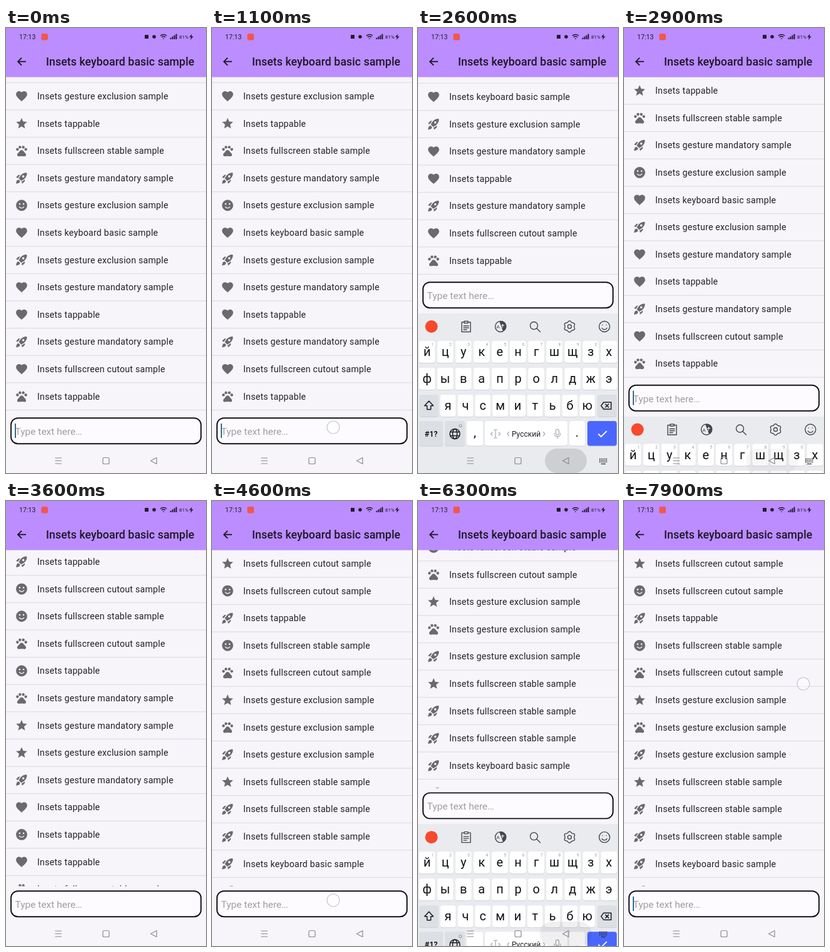
Write an HTML page that moves like this. It is 320 by 711 pixels and loops after 8 s.

```html
<!DOCTYPE html>
<html lang="en">
<head>
<meta charset="utf-8">
<title>Insets keyboard basic sample</title>
<style>
  html, body { margin: 0; width: 100%; height: 100%; overflow: hidden; background: #f7f5fa; }
  svg { display: block; width: 100%; height: 100%; font-family: Roboto, sans-serif; }
  .item { font-size: 14.22px; letter-spacing: .21px; fill: #222125; }
  .key { font-size: 20px; fill: #111214; text-anchor: middle; }
  .hint { font-size: 6.5px; fill: #9a9ca2; text-anchor: middle; }
  .line { fill: none; stroke: #44474c; stroke-width: 1.4; stroke-linecap: round; stroke-linejoin: round; }
  .dark { fill: none; stroke: #1c1d20; stroke-width: 1.5; stroke-linecap: round; stroke-linejoin: round; }
  .soft { fill: none; stroke: #a5a8ae; stroke-width: 1.2; stroke-linecap: round; stroke-linejoin: round; }
  .nav { fill: none; stroke: #8b8a8f; stroke-width: 1.2; stroke-linejoin: round; }
</style>
</head>
<body>
<svg id="stage" viewBox="0 0 320 711"></svg>
<script>
const LOOP = 8000, STEP = 100, PITCH = 43.6, LAST_Y = 588.6, LIFT = 217, SCROLL = 1473.4;

const icons = {
  h: 'M12 21.4C5.4 15.4 2 12.3 2 8.5 2 5.4 4.4 3 7.5 3c1.7 0 3.4.8 4.5 2.1C13.1 3.8 14.8 3 16.5 3 19.6 3 22 5.4 22 8.5c0 3.8-3.4 6.9-10 12.9z',
  t: 'M12 17.3L18.2 21l-1.7-7L22 9.2l-7.2-.6L12 2 9.2 8.6 2 9.2 7.5 14 5.8 21z',
  s: 'M12 2a10 10 0 1 0 .01 0zM8.5 8a1.5 1.5 0 1 0 .01 0zM15.5 8a1.5 1.5 0 1 0 .01 0z' +
     'M12 16c-1.5 0-2.8-.8-3.5-2H6.9c.8 2 2.8 3.5 5.1 3.5s4.3-1.5 5.1-3.5h-1.6c-.7 1.2-2 2-3.5 2z',
  p: 'M4.5 7a2.5 2.5 0 1 0 .01 0zM9 3a2.5 2.5 0 1 0 .01 0zM15 3a2.5 2.5 0 1 0 .01 0zM19.5 7a2.5 2.5 0 1 0 .01 0z' +
     'M17.3 14.9l-2.4-2.9c-1.6-1.9-4.2-1.9-5.8 0l-2.4 2.9c-1.3 1.3-3 2.8-2.7 4.8.3 1 1 2 2.4 2.3 1.4.2 3-.4 5.6-.4s4.2.6 5.6.4c1.4-.3 2.1-1.3 2.4-2.3.3-2-1.4-3.5-2.7-4.8z',
  r: 'M9.2 6.3c-2 2.3-3.4 5.6-3.6 5.9L2 10.7l4-4.1c.5-.5 1.2-.7 1.9-.5zM11.2 17s3.7-1.6 5.9-3.7c5.4-5.4 4.5-9.6 4.2-10.6-1-.3-5.2-1.2-10.6 4.2C8.6 9.1 7 12.8 7 12.8z' +
     'M17.6 14.8c-2.3 2-5.6 3.4-5.9 3.6l1.6 3.6 4.1-4c.4-.5.6-1.2.5-1.9zM9 18c0 .8-.3 1.6-.9 2.1C6.9 21.3 2 22 2 22s.7-4.9 1.9-6.1C6 13.8 9 15.5 9 18zM15 7a2 2 0 1 0 .01 0z'
};
const labels = ['gesture exclusion', 'tappable', 'fullscreen stable', 'gesture mandatory', 'keyboard basic', 'fullscreen cutout'];

// Rows from the bottom of the list upwards: icon letter, label index.
const rows = ('p1 h5 r3 h1 h3 r0 h4 s0 r3 p2 t1 h0 s5 t4 p0 r2 h5 s1 p2 h1 s1 h1 r3 t0 t3 p3 s1 p5 s2 s5 r1 ' +
  't0 h4 r2 r4 r2 r2 t2 r0 p0 t0 p5 s2 r1 s5 t5 h0 p3').split(' ');

const text = (x, y, s, attrs = '') => `<text x="${x}" y="${y}" ${attrs}>${s}</text>`;
const path = (d, cls = 'line', attrs = '') => `<path d="${d}" class="${cls}" ${attrs}/>`;
const rect = (x, y, w, h, rx, fill, attrs = '') =>
  `<rect x="${x}" y="${y}" width="${w}" height="${h}" rx="${rx}" fill="${fill}" ${attrs}/>`;
const circle = (x, y, r, attrs) => `<circle cx="${x}" cy="${y}" r="${r}" ${attrs}/>`;
const at = (x, y, inner) => `<g transform="translate(${x} ${y})">${inner}</g>`;

const listRow = (code, k) => {
  const [icon, n] = code;
  const label = 'Insets ' + labels[n] + (n === '1' ? '' : ' sample');
  return at(0, LAST_Y - PITCH * k,
    `<path d="${icons[icon]}" fill="#6b696e" fill-rule="evenodd" transform="translate(14.3 -10.7) scale(.889)"/>` +
    text(50, 5, label, 'class="item"') + rect(0, 21.3, 320, 1.1, 0, '#dddbe1'));
};

const header =
  rect(0, 0, 320, 78.5, 0, '#bb8dff') +
  text(21, 18, '17:13', 'font-size="10.6" fill="#211b2c"') +
  rect(56.5, 9, 10.5, 10.5, 2.5, '#f2564c') +
  rect(222, 11, 6, 6, 0, '#211b2c') + circle(237, 14, 2.8, 'fill="#211b2c"') +
  path('M247 12.5a7 7 0 0 1 10 0M249 14.8a4.2 4.2 0 0 1 6 0M251.3 17h1.4', 'wifi', 'fill="none" stroke="#211b2c" stroke-width="1.5"') +
  [0, 1, 2, 3].map(i => rect(262.5 + 3 * i, 15.5 - 2 * i, 2, 2.5 + 2 * i, .5, '#211b2c')).join('') +
  text(277, 17, '81%', 'font-size="8" fill="#211b2c"') +
  path('M297.5 9.5l-4.5 5h3l-1 4.5 4.8-5.5h-3z', 'bolt', 'fill="#211b2c"') +
  path('M32 53.7H19.5M25 47.7l-6 6 6 6', 'arrow', 'fill="none" stroke="#17121f" stroke-width="1.8"') +
  text(64, 60, 'Insets keyboard basic sample', 'font-size="17.8" font-weight="500" letter-spacing=".04" fill="#1d1628"');

const field =
  rect(0, 615.5, 320, 300, 0, '#f7f5fa') +
  rect(8, 623.2, 304, 41, 11, '#fdfbff', 'stroke="#121114" stroke-width="1.9"') +
  text(14.5, 650, 'Type text here…', 'font-size="15.5" fill="#9f9da2"') +
  rect(14, 632, 2, 23, 0, '#2b6f92', 'id="cursor"');

const key = (x, y, w, fill = '#fff', h = 35) =>
  rect(x, y + 1, w, h, 4, '#cdd0d6') + rect(x, y, w, h, 4, fill);
const wideKey = (x, w, fill) => key(x, 628, w, fill, 39.5);
const letters = (chars, x0, pitch, w, y, hints = '') => [...chars].map((c, i) => {
  const x = x0 + pitch * i;
  return key(x - w / 2, y, w) + text(x, y + 24, c, 'class="key"') +
    (hints[i] ? text(x + 8.5, y + 7.5, hints[i], 'class="hint"') : '');
}).join('');

const lobes = Array.from({ length: 48 }, (_, i) => {
  const a = i * Math.PI / 24, r = 8.2 + .9 * Math.cos(6 * a);
  return (r * Math.sin(a)).toFixed(2) + ' ' + (r * Math.cos(a)).toFixed(2);
});
const gear = path(`M${lobes.join('L')}z`) + circle(0, 0, 3, 'class="line"');
const search = circle(-1.5, -1.5, 6, 'class="line"') + path('M3 3l5.5 5.5');
const smile = circle(0, 0, 8.5, 'class="line"') + path('M-4 2.5c1.5 3 6.5 3 8 0M-3-2.5v.1M3-2.5v.1');
const clipboard = path('M-3-7h-4V8.5h14V-7h-4M-3-8.5h6v3h-6zM-4-1h8M-4 2h8M-4 5h5');
const translate = circle(0, 0, 8.5, 'class="line"') + path('M-2-8.5a8.5 8.5 0 1 1 6 16z', 'half', 'fill="#44474c"') +
  text(-6.5, 3, 'A', 'font-size="8" fill="#44474c"') + path('M1-2h5M3.5-4v2c0 3-1 4-2.5 5', 'half', 'fill="none" stroke="#fff"');
const globe = circle(0, 0, 8, 'class="dark"') + '<ellipse rx="3.6" ry="8" class="dark"/>' + path('M-7.5-3h15M-7.5 3h15', 'dark');

const GREY = '#dcdfe4', WHITE = '#fff';
const keyboard =
  rect(0, 456, 320, 300, 0, '#e9ebef') +
  circle(21.5, 477, 10, 'fill="#f9482b"') + at(298.3, 477, smile) +
  `<g id="compact">${at(70, 477, search)}${at(150.5, 477, gear)}</g>` +
  `<g id="full">${at(77, 477, clipboard)}${at(132, 477, translate)}${at(187, 477, search)}${at(242.5, 477, gear)}</g>` +
  letters('йцукенгшщзх', 14.5, 29.1, 26, 500, '1234567890') +
  letters('фывапролджэ', 14.5, 29.1, 26, 543) +
  letters('ячсмитьбю', 48, 27.85, 25, 586) +
  key(2, 586, 31, GREY) + path('M17.5 596l-7 7.5h4v6h6v-6h4z', 'dark') +
  key(287, 586, 31, GREY) + path('M293 603.5l4-5.5h12v11h-12zM300 601l5 5M305 601l-5 5', 'dark') +
  wideKey(2, 38, GREY) + text(21, 652.5, '#1?', 'font-size="12.5" font-weight="500" text-anchor="middle"') +
  wideKey(43, 32, GREY) + at(59, 648.5, globe) + circle(68, 635.5, 2, 'class="soft"') +
  wideKey(78, 26, WHITE) + text(91, 653, ',', 'class="key"') +
  wideKey(107, 132, WHITE) + text(173, 652.5, 'Русский', 'font-size="12" fill="#222428" text-anchor="middle"') +
  path('M124 643v11M121.5 642h5M121.5 655h5M119 646l-2.5 2.5 2.5 2.5M129 646l2.5 2.5-2.5 2.5M145.5 645.5l-2.5 3 2.5 3M200.5 645.5l2.5 3-2.5 3', 'soft') +
  rect(220.5, 641, 5, 9, 2.5, 'none', 'class="soft"') + path('M218 647.5c0 7 10 7 10 0M223 653v3', 'soft') +
  wideKey(242, 25, WHITE) + text(254.5, 653, '.', 'class="key"') +
  wideKey(271, 47, '#4a66ff') + path('M288.5 648.5l4.5 4.5 9-9', 'check', 'fill="none" stroke="#fff" stroke-width="1.8"');

const nav =
  `<rect id="ripple" y="672" height="39" rx="19.5" fill="#000"/>` +
  path('M78.5 687h10.5M78.5 691.5h10.5M78.5 696h10.5', 'nav') +
  rect(155, 686.5, 10, 10, 2, 'none', 'class="nav"') +
  path('M241 686.5v10l-9.5-5z', 'nav') +
  `<g id="switcher">${path('M290 688.5h13M290 691h13M290 693.5h13', 'dots', 'stroke="#333" stroke-width="1.6" stroke-dasharray="1.6 1.1"')}` +
  `${path('M293 696.5h7', 'dots', 'stroke="#333" stroke-width="1.3"')}</g>`;

const stage = document.getElementById('stage');
stage.innerHTML = rect(0, 0, 320, 711, 0, '#f7f5fa') +
  `<g id="list">${rows.map(listRow).join('')}</g><g id="field">${field}</g>${header}` +
  `<g id="keyboard">${keyboard}</g>${nav}` +
  circle(0, 0, 10, 'id="touch" fill="#fff" fill-opacity=".45" stroke="#c3c4d8" stroke-width="1.2"');

const ids = ['list', 'field', 'keyboard', 'cursor', 'compact', 'full', 'ripple', 'switcher', 'touch'];
const parts = Object.fromEntries(ids.map(id => [id, document.getElementById(id)]));
const set = (id, attrs) => { for (const a in attrs) parts[id].setAttribute(a, attrs[a]); };
const show = (id, on) => set(id, { visibility: on ? 'inherit' : 'hidden' });
const move = (id, x, y) => set(id, { transform: `translate(${x} ${y})` });

const ramp = (t, start, length) => Math.min(1, Math.max(0, (t - start) / length));
const easeOut = (u, power) => 1 - (1 - u) ** power;
const smooth = u => u * u * (3 - 2 * u);

// start, end, x, y, downward travel
const touches = [[1100, 1200, 194, 638, 0], [3300, 3600, 172, 300, 150], [4600, 4700, 194, 638, 0], [7800, 8000, 287, 292, 0]];
const cycles = [{ open: 1150, close: 2696 }, { open: 4700, close: 6196 }];

function draw(t) {
  const cycle = cycles[t < 4000 ? 0 : 1];
  const lift = LIFT * (easeOut(ramp(t, cycle.open, 500), 3) - smooth(ramp(t, cycle.close, 300)));
  const scroll = SCROLL * easeOut(ramp(t, 3300, 903), 2);
  move('list', 0, scroll - lift);
  move('field', 0, -lift);
  move('keyboard', 0, LIFT - lift);
  set('keyboard', { opacity: Math.min(1, lift / 15) });
  show('switcher', lift > 1);

  const expanded = t >= cycle.open + 570;
  show('compact', !expanded);
  show('full', expanded);
  show('cursor', (t + 300) % 1000 < 500);

  const fade = ramp(t, cycle.close - 96, 400);
  const grow = 8 * Math.min(1, fade * 2);
  set('ripple', { x: 203 - grow, width: 67 + 2 * grow, opacity: t < cycle.close - 116 ? 0 : .12 * (1 - fade) });

  const touch = touches.find(([a, b]) => t >= a && t < b);
  show('touch', touch);
  if (touch) {
    const [a, b, x, y, travel] = touch;
    move('touch', x, y + travel * ramp(t, a, b - a));
  }
}

// The picture advances ten times a second.
function frame() {
  draw(Math.floor(performance.now() % LOOP / STEP) * STEP);
  requestAnimationFrame(frame);
}
frame();
</script>
</body>
</html>
```
